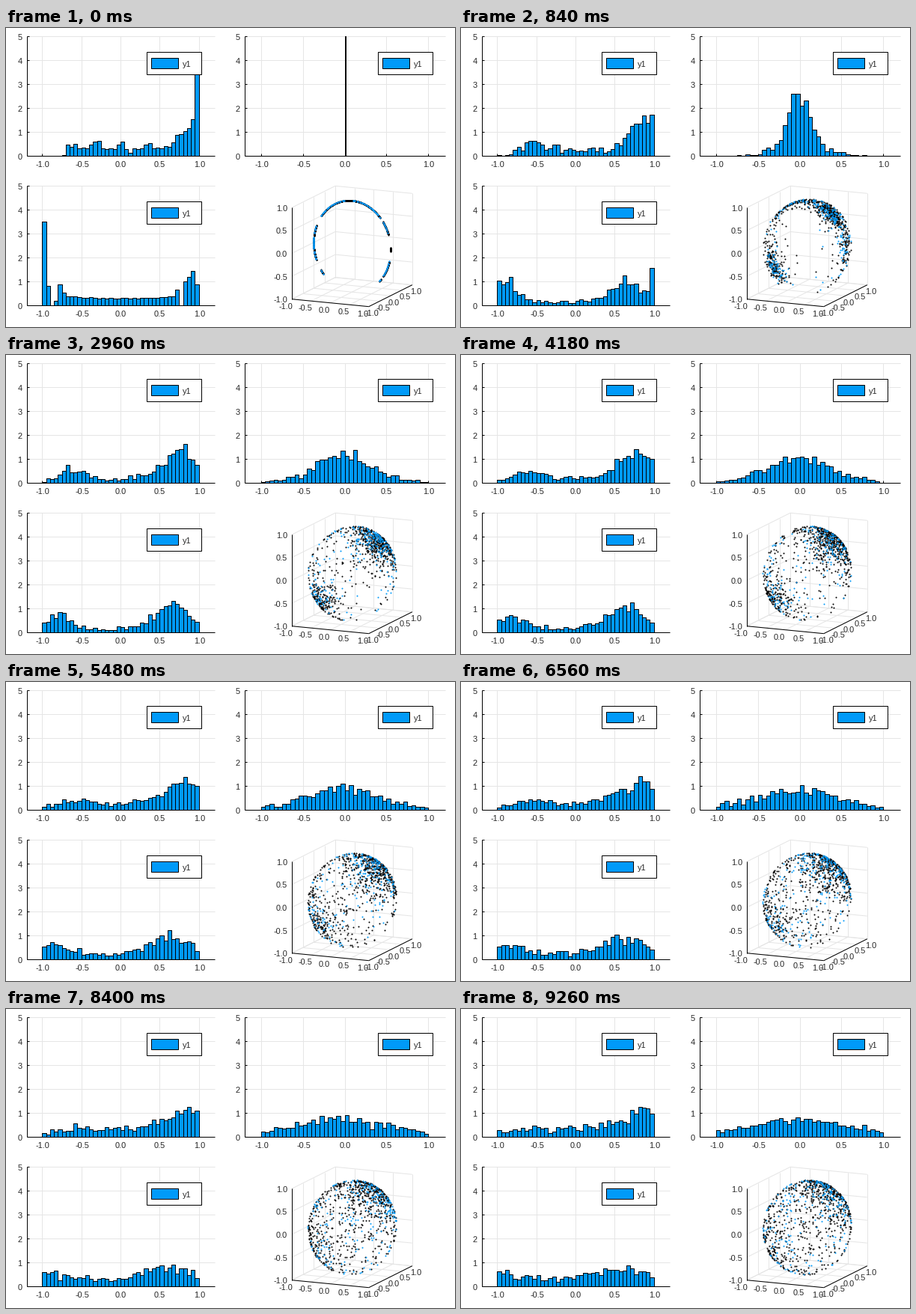
A matplotlib script for the animation above (9280 ms loop, 600 px wide and 400 px high).

```python
import numpy as np
import matplotlib.pyplot as plt
from matplotlib.animation import FuncAnimation
from matplotlib.collections import LineCollection, PolyCollection
from matplotlib.patches import Rectangle

W, H, DPI = 600, 400, 100
PX = 72 / DPI
BLUE, INK, GRID = "#009af9", "#262626", "#e5e5e5"
N, STEPS = 1000, 200
UNIT = 32                     # pixels per unit of density
TICKS = (-1, -0.5, 0, 0.5, 1)

plt.rcParams["font.family"] = "Liberation Sans"
fig = plt.figure(figsize=(W / DPI, H / DPI), dpi=DPI, facecolor="white")
ax = fig.add_axes([0, 0, 1, 1])
ax.set(xlim=(0, W), ylim=(H, 0))
ax.axis("off")


def simulate():
    """Random walk on the unit sphere, starting on arcs of the y = 0 circle."""
    rng = np.random.default_rng(12)
    arcs = np.array([(-132.3, -125.2), (-112, -83.5), (-82, -67.5), (-53.5, 47.5),
                     (53.1, 71), (87, 92), (104.5, 126.7), (131.4, 134.9)])
    size = arcs[:, 1] - arcs[:, 0]
    ends = np.cumsum(size)
    u = (np.arange(N) + rng.random(N)) / N * ends[-1]
    k = np.searchsorted(ends, u)
    phi = np.radians(arcs[k, 1] - (ends[k] - u))
    v = np.stack([np.sin(phi), np.zeros(N), np.cos(phi)], axis=1)
    spread = 0.038 * np.exp(0.4 * rng.standard_normal((N, 1)))
    path = [v]
    for n in range(STEPS - 1):
        # two opposite wells on the circle fade while noise and lift grow
        pull = 0.085 * np.exp(-n / 30)
        grow = 1 - np.exp(-n / 50)
        x, z = v[:, 0], v[:, 2]
        turn = -pull / 2 * np.sin(2 * (np.arctan2(x, z) - np.pi / 4))
        drift = np.stack([z * turn, 0 * x, -x * turn], axis=1)
        drift[:, 2] += 0.0015 * grow
        v = v + drift + spread * (1 + 0.4 * grow) * rng.standard_normal((N, 3))
        v = v / np.linalg.norm(v, axis=1, keepdims=True)
        path.append(v)
    return path


def project(x, y, z):
    return 462.4 + 51.4 * x + 29 * y, 292 + 5 * x - 14.5 * y - 61.2 * z


def label(x, y, s, ha="center"):
    ax.text(x, y + 4, s, ha=ha, va="baseline", size=11 * PX, color=INK, zorder=6)


def lines(segs, color, z):
    ax.add_collection(LineCollection(segs, colors=color, linewidths=PX, zorder=z))


def box(x, y, w, h, color):
    ax.add_patch(Rectangle((x, y), w, h, fc=color, ec="black", lw=PX, zorder=5))


class Hist:
    """Density histogram panel with fixed axes, placed on whole pixels."""

    def __init__(self, left, right, base, legend):
        self.mid, self.scale = (left + right) / 2, (right - left) / 2.4
        self.base = base
        top = base - 5 * UNIT
        xs = [self.to_px(t) for t in TICKS]
        ys = [base - UNIT * k for k in range(6)]
        lines([[(x, top), (x, base)] for x in xs]
              + [[(left, y), (right, y)] for y in ys], GRID, 0)
        lines([[(left, top), (left, base)], [(left, base), (right, base)]]
              + [[(x, base), (x, base - 3)] for x in xs]
              + [[(left, y), (left + 3, y)] for y in ys], "black", 4)
        for x, t in zip(xs, TICKS):
            label(x + .5, base + 11, f"{t:.1f}")
        for k, y in enumerate(ys):
            label(left - 6.5, y + .5, str(k), "right")
        box(legend, base - 139, 73, 30, "white")
        box(legend + 6, base - 131, 36, 14, BLUE)
        label(legend + 47.5, base - 123.5, "y1", "left")
        self.bars = PolyCollection([], facecolors=BLUE, edgecolors="black",
                                   linewidths=PX, zorder=3)
        ax.add_collection(self.bars)

    def to_px(self, value):
        return np.floor(self.mid + self.scale * value)

    def update(self, data):
        step = bin_width(np.ptp(data))
        lo = int(np.floor(data.min() / step))
        hi = max(int(np.ceil(data.max() / step)), lo + 1)
        edges = np.arange(lo, hi + 1) * step
        count, _ = np.histogram(data, edges)
        x, b = self.to_px(edges), self.base
        tops = b - np.round(np.minimum(UNIT * count / (N * step), 5 * UNIT))
        right = np.maximum(x[1:], x[:-1] + 1)
        self.bars.set_verts([[(p, b), (p, t), (q, t), (q, b)]
                             for p, q, t in zip(x[:-1], right, tops)])


def bin_width(span):
    """Nice width (1, 2 or 5 times a power of ten) for about 40 bins."""
    raw = max(span / 40, 1e-3)
    p = 10 ** np.floor(np.log10(raw))
    m = raw / p
    return p * (1 if m <= 1.1 else 2 if m <= 2.2 else 5 if m <= 5.5 else 10)


def draw_cube():
    seg = lambda a, b: [project(*a), project(*b)]
    grid = []
    for t in TICKS:
        grid += [seg((t, -1, -1), (t, 1, -1)), seg((t, 1, -1), (t, 1, 1)),
                 seg((-1, t, -1), (1, t, -1)), seg((-1, t, -1), (-1, t, 1)),
                 seg((-1, -1, t), (-1, 1, t)), seg((-1, 1, t), (1, 1, t))]
    lines(grid, GRID, 0)
    a, b, c, d = (-1, -1, 1), (-1, -1, -1), (1, -1, -1), (1, 1, -1)
    lines([seg(a, b), seg(b, c), seg(c, d)], "black", 1)
    for t in TICKS:
        s = f"{t:.1f}"
        x, y = project(-1, -1, t)
        label(x - 6, y + .5, s, "right")
        x, y = project(t, -1, -1)
        label(x - 8, y + 9, s)
        x, y = project(1, t, -1)
        label(x + 4.5, y + 8.5, s)


def dots(color, z):
    return ax.plot([], [], "o", ms=2 * PX, mfc=color, mec="none", zorder=z)[0]


path = simulate()
hists = [Hist(28, 279, 171, 188), Hist(319, 587, 171, 497), Hist(28, 279, 371, 188)]
draw_cube()
black, blue = dots("black", 2), dots(BLUE, 3)


def step_at(i):
    """Three poses per 140 ms, held for 20, 100 and 20 ms."""
    m, r = divmod(i, 7)
    return 3 * m + (r > 0) + (r > 5)


def update(i):
    v = path[step_at(i)]
    for hist, axis in zip(hists, (2, 1, 0)):
        hist.update(v[:, axis])
    x, y = project(*v.T)
    lit = (x % 1 < .5) & (y % 1 < .5)
    blue.set_data(x[lit], y[lit])
    black.set_data(x[~lit], y[~lit])
    return [h.bars for h in hists] + [blue, black]


anim = FuncAnimation(fig, update, frames=464, interval=20, repeat=True,
                     repeat_delay=0, cache_frame_data=False)
plt.show()
```
